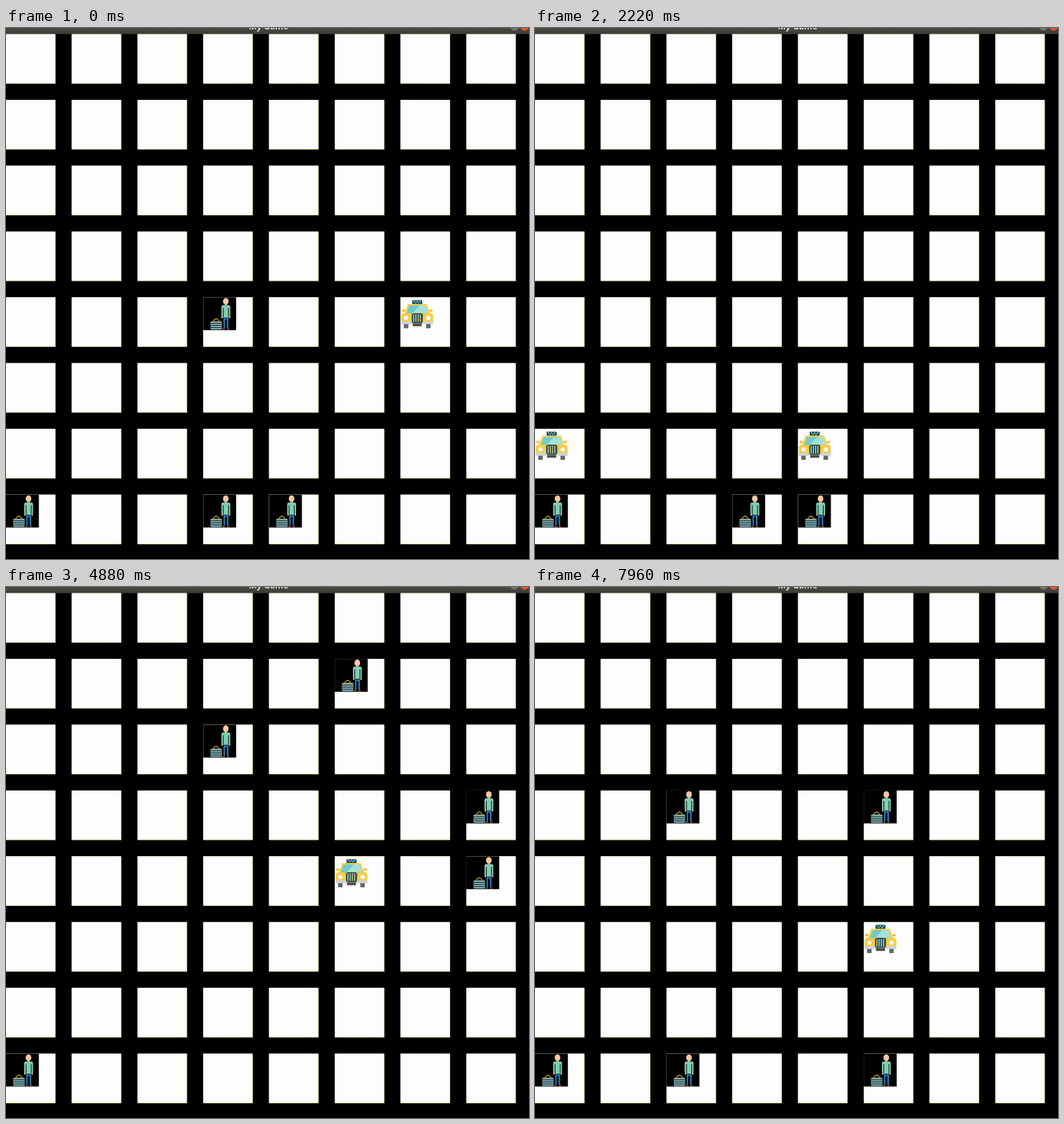
An HTML page with a canvas for the animation above (8000 ms loop, 743 px wide and 754 px high).

```html
<!DOCTYPE html>
<html lang="en">
<head>
<meta charset="utf-8">
<title>My Game</title>
<style>
  html, body { margin: 0; width: 100%; height: 100%; overflow: hidden; background: #000; }
  canvas { display: block; width: 743px; height: 754px; }
</style>
</head>
<body>
<canvas id="stage" width="743" height="754"></canvas>
<script>
const ctx = document.getElementById('stage').getContext('2d');
const LOOP = 8000, PITCH = 93.42, SIZE = 70, TOP = 8.7;

// Cells are written as "column row". Each turn: time, taxis, riders gone, riders new.
const start = '34 07 37 47';
const turns = [
  [0, '64'], [20, '54'], [540, '44'], [840, '56', '34', '55'],
  [1140, '43', '55'], [1540, '44 06'], [1940, '45 06'], [2220, '46 06'],
  [2540, '36', '47', '51 73'], [2920, '14', '37', '20'], [3240, '13'],
  [3640, '23'], [3940, '22'], [4340, '21'], [4740, '54', '20', '32 74'],
  [5020, '64'], [5340, '52', '74', '57'], [5720, '72', '51', '27'],
  [6140, '60', '73', '23'], [6440, '50'], [6740, '51'], [7000, '52'],
  [7440, '42'], [7840, '55', '32', '53']
];

const split = s => s ? s.split(' ') : [];

function stateAt(t) {
  const riders = new Set(split(start));
  let taxis = [];
  for (const [at, cars, gone, added] of turns) {
    if (at > t) break;
    taxis = split(cars);
    split(gone).forEach(c => riders.delete(c));
    split(added).forEach(c => riders.add(c));
  }
  return { riders, taxis };
}

function box(color, x, y, w, h) {
  ctx.fillStyle = color;
  ctx.fillRect(x, y, w, h);
}

function poly(color, ...p) {
  ctx.fillStyle = color;
  ctx.beginPath();
  for (let i = 0; i < p.length; i += 2) ctx.lineTo(p[i], p[i + 1]);
  ctx.fill();
}

function oval(color, x, y, rx, ry = rx) {
  ctx.fillStyle = color;
  ctx.beginPath();
  ctx.ellipse(x, y, rx, ry, 0, 0, Math.PI * 2);
  ctx.fill();
}

function round(color, x, y, w, h, r) {
  ctx.fillStyle = color;
  ctx.beginPath();
  ctx.roundRect(x, y, w, h, r);
  ctx.fill();
}

function drawRider() {
  box('#000', 0, 0, 46.7, 46.7);
  oval('#f8c9a0', 32, 5.8, 4, 4.8);
  box('#e9b48c', 30.5, 9, 3, 2.5);
  round('#7fcdb0', 25.8, 11, 12.6, 17.5, 2.5);
  box('#000', 28, 15, 0.9, 13);
  box('#000', 35.4, 15, 0.9, 13);
  box('#f0bd95', 26, 27.5, 1.8, 2.3);
  box('#f0bd95', 36.5, 27.5, 1.8, 2.3);
  box('#1f5f94', 28.8, 29, 6.8, 3);
  box('#2c86c8', 28.8, 30, 1.8, 14);
  box('#2c86c8', 33.6, 30, 2, 14);
  box('#a9583c', 27.2, 44.5, 3.6, 1.4);
  box('#a9583c', 33.6, 44.5, 3.6, 1.4);

  ctx.strokeStyle = '#d59d22';
  ctx.lineWidth = 1.2;
  ctx.beginPath();
  ctx.moveTo(14, 34);
  ctx.quadraticCurveTo(18.3, 27, 22.6, 34);
  ctx.stroke();
  round('#7dabae', 10.2, 34, 16.4, 11.8, 1.5);
  for (let i = 0; i < 3; i++) box('#14272b', 10.2, 36.6 + i * 3, 16.4, 1);
  box('#c99b3d', 13, 34, 1.2, 2.6);
  box('#c99b3d', 22.5, 34, 1.2, 2.6);
}

function drawTaxi() {
  round('#17505a', 16.6, 4, 14.2, 6.2, 1);
  for (let i = 0; i < 5; i++) box('#d5e9e4', 18.6 + i * 2.1, i % 2 ? 7 : 5.3, 1.5, 1.4);
  for (const x of [5, 36.6]) box('#62656d', x - 0.4, 37, 6.4, 7);
  round('#f3bd35', 1.8, 17, 5, 3.4, 1.5);
  round('#f3bd35', 40.6, 17, 5, 3.4, 1.5);
  poly('#fbd043', 10.5, 9.5, 37, 9.5, 42.5, 25, 5, 25);
  round('#fbd043', 1, 22, 45.4, 15, 5);
  poly('#70cbcf', 12.5, 11.5, 35, 11.5, 39, 23, 8.5, 23);
  poly('#a5e1dc', 27, 11.5, 35, 11.5, 39, 23, 16, 23);
  poly('#f4bf37', 13.5, 22, 34, 22, 31.5, 37, 16, 37);
  round('#174f59', 16, 22.5, 15.5, 14, 2.5);
  for (let i = 0; i < 4; i++) box('#f2dda0', 18 + i * 3.2, 24, 1.2, 11);
  for (const x of [7.9, 39.5]) {
    oval('#f2bd35', x, 29.3, 4.2);
    oval('#fff', x, 29.3, 3.2);
  }
  box('#d0d3d8', 0.8, 34.2, 15.2, 4);
  box('#d0d3d8', 31.4, 34.2, 15.2, 4);
  round('#4a4d54', 17.2, 37, 13, 4, 0.8);
}

function place(cell, draw) {
  ctx.save();
  ctx.translate(cell[0] * PITCH, TOP + cell[1] * PITCH);
  draw();
  ctx.restore();
}

function drawCell() {
  box('#cfd38a', 0, 0, SIZE + 0.5, SIZE + 0.5);
  box('#fdfdfd', 0, 0, SIZE - 0.3, SIZE - 0.3);
}

function drawBar() {
  const g = ctx.createLinearGradient(0, 0, 0, 9);
  g.addColorStop(0, '#4b4a44');
  g.addColorStop(1, '#3b3a35');
  box(g, 0, 0, 743, 8.7);
  ctx.fillStyle = '#e6e4df';
  ctx.font = 'bold 12px "Open Sans", sans-serif';
  ctx.textAlign = 'center';
  ctx.fillText('My Game', 373, 2.3);
  oval('#78756d', 722.5, -2.3, 6);
  oval('#e6562b', 737, -2.3, 6.2);
}

function render(t) {
  box('#000', 0, 0, 743, 754);
  drawBar();
  for (let i = 0; i < 64; i++) place([i % 8, i >> 3], drawCell);
  const { riders, taxis } = stateAt(t);
  riders.forEach(c => place(c, drawRider));
  taxis.forEach(c => place(c, drawTaxi));
}

const begin = performance.now();
function frame(now) {
  render(Math.max(0, now - begin) % LOOP);
  requestAnimationFrame(frame);
}
render(0);
requestAnimationFrame(frame);
</script>
</body>
</html>
```
